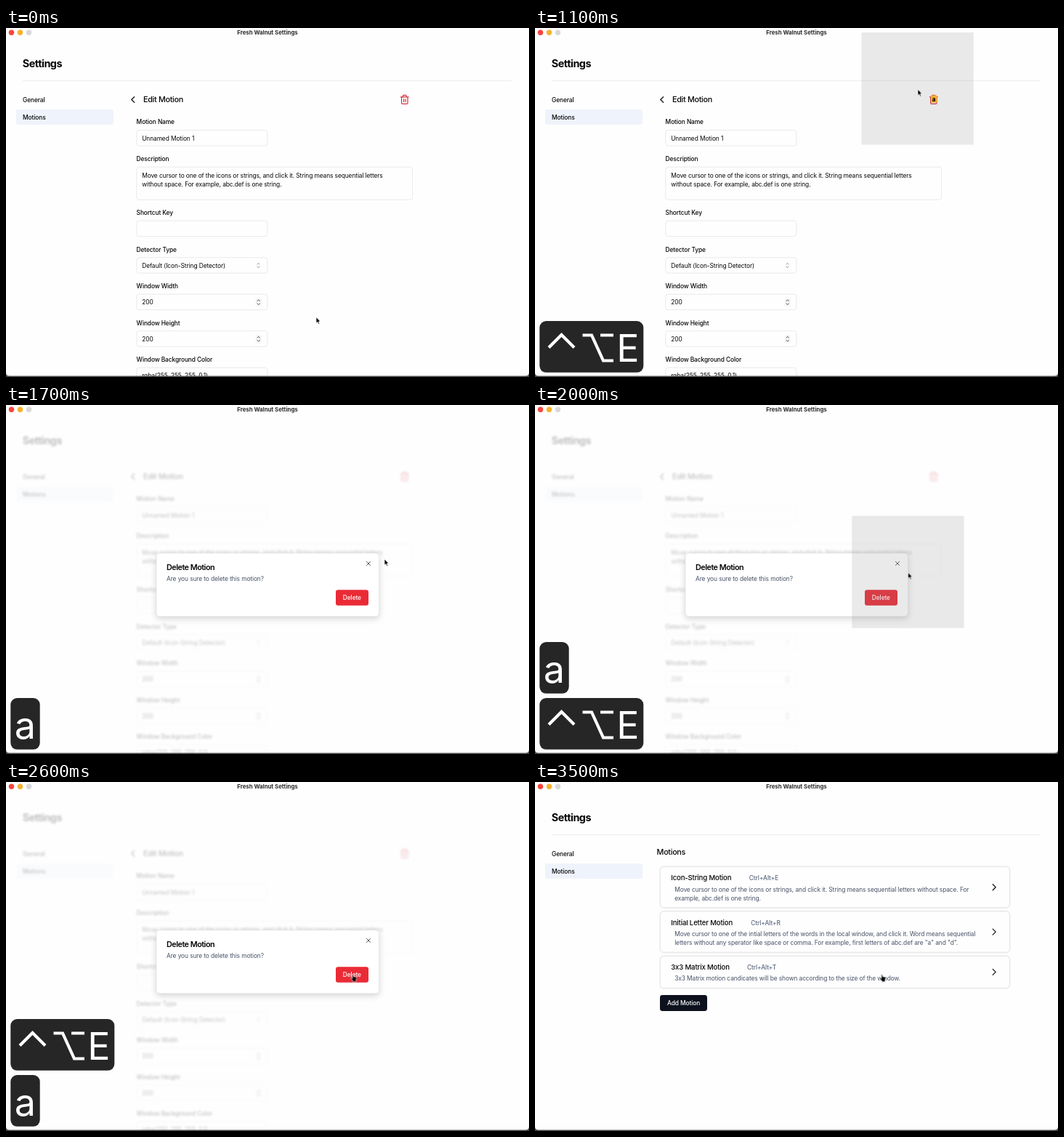
An HTML page that plays this animation: 720 by 480 pixels, repeating every 3600 ms.

```html
<!DOCTYPE html>
<html lang="en">
<head>
<meta charset="utf-8">
<title>Settings</title>
<style>
  html, body { margin: 0; width: 100%; height: 100%; overflow: hidden; background: #fefefe; }
  svg { display: block; width: 720px; height: 480px; }
  text {
    font: 430 8.4px Inter, "Noto Sans", sans-serif; letter-spacing: -.0115em;
    fill: #050608; white-space: pre; transform: translateY(.35px);
  }
  .label { font-weight: 540; letter-spacing: -.012em; }
  .bar { font-size: 7.8px; font-weight: 650; letter-spacing: 0; fill: #2c2c2c; }
  .h1 { font-size: 14.4px; font-weight: 700; letter-spacing: -.037em; }
  .h2 { font-size: 10.8px; font-weight: 530; letter-spacing: -.028em; }
  .h3 { font-size: 9.6px; font-weight: 530; letter-spacing: -.016em; }
  .ask { font-size: 10.8px; font-weight: 600; letter-spacing: -.046em; }
  .muted { fill: #465166; }
  .short { fill: #5d6a80; font-weight: 500; }
  .mid { text-anchor: middle; }
  .light { fill: #fff; }
  .tag { font-size: 8px; font-weight: 800; }
  .glyph { font-size: 52px; font-weight: 400; letter-spacing: 0; fill: #fff; }
  .line { fill: none; stroke: #16181d; stroke-width: 1.3; stroke-linecap: round; stroke-linejoin: round; }
  .field, .card { fill: #fefefe; stroke: #e2e5ea; stroke-width: .8; }
  .card { stroke: #dcdfe5; filter: drop-shadow(0 .8px .8px rgba(0, 0, 0, .1)); }
  .field { rx: 3.2px; }
  .card { rx: 5px; }
  .key { fill: #262626; rx: 9px; }
  .stroke { fill: none; stroke: #fff; stroke-width: 4.2; }

  .page, .form, .list, .dialog, .lens, .tagA, .tagB, .combo, .single, .arrow, .hand {
    animation: 3600ms step-end infinite;
  }
  .page { animation-name: page; }
  .form { animation-name: form; }
  .list { animation-name: list; }
  .dialog { animation-name: dialog; }
  .lens { animation-name: lens; }
  .tagA { animation-name: tagA; }
  .tagB { animation-name: tagB; }
  .combo { animation-name: combo; }
  .single { animation-name: single; }
  .arrow { animation-name: arrow; }
  .hand { animation-name: hand; }

  @keyframes page {
    0%, 75%, 100% { filter: none; opacity: 1; }
    38.88% { filter: blur(1.8px); opacity: .24; }
  }
  @keyframes form { 0% { opacity: 1; } 75%, 100% { opacity: 0; } }
  @keyframes list { 0% { opacity: 0; } 75%, 100% { opacity: 1; } }
  @keyframes dialog { 0%, 75%, 100% { opacity: 0; } 38.88% { opacity: 1; } }
  @keyframes lens {
    0%, 36.11%, 69.44%, 100% { opacity: 0; }
    25% { opacity: 1; transform: translate(449.8px, 6.5px); }
    52.77% { opacity: 1; transform: translate(436.6px, 152.8px); }
  }
  @keyframes tagA { 0%, 36.11%, 100% { opacity: 0; } 30.55% { opacity: 1; } }
  @keyframes tagB { 0%, 69.44%, 100% { opacity: 0; } 58.33% { opacity: 1; } }
  @keyframes combo {
    0%, 47.22%, 77.77%, 100% { opacity: 0; }
    22.22%, 50% { opacity: 1; transform: none; }
    36.11%, 69.44% { opacity: 1; transform: translateY(-77px); }
    44.44%, 75% { opacity: .5; }
  }
  @keyframes single {
    0%, 58.33%, 94.44%, 100% { opacity: 0; }
    36.11%, 69.44% { opacity: 1; transform: none; }
    50% { opacity: 1; transform: translateY(-77px); }
    91.66% { opacity: .5; }
  }
  @keyframes arrow {
    0%, 100% { opacity: 1; transform: translate(427px, 397.7px); }
    8.33% { transform: translate(430px, 390px); }
    11.11% { transform: translate(446px, 345px); }
    13.88% { transform: translate(476px, 245px); }
    16.66% { transform: translate(507px, 147px); }
    19.44% { transform: translate(523px, 96px); }
    22.22% { transform: translate(527px, 84.5px); }
    36.11% { opacity: 0; }
    41.66% { opacity: 1; transform: translate(547px, 112px); }
    44.44% { transform: translate(538px, 155px); }
    47.22% { transform: translate(521px, 212px); }
    50% { transform: translate(513.6px, 230.5px); }
    69.44% { opacity: 0; }
  }
  @keyframes hand {
    0%, 41.66%, 100% { opacity: 0; }
    36.11% { opacity: 1; transform: translate(546.5px, 97.3px); }
    69.44% { opacity: 1; transform: translate(474.5px, 264.3px); }
  }
</style>
</head>
<body>
<svg viewBox="0 0 720 480">
  <defs>
    <path id="next" class="line" d="M-1.8 -4l4 4l-4 4"/>
    <g id="spin">
      <rect x="-4" y="-6" width="8" height="12" rx="2" fill="#f5f5f5"/>
      <path class="line" style="stroke:#444;stroke-width:.95" d="M-1.7 -1.7L0 -3.4L1.7 -1.7M-1.7 1.7L0 3.4L1.7 1.7"/>
    </g>
  </defs>
  <rect width="720" height="480" fill="#fefefe"/>

  <g class="page">
    <text class="h1" x="22.8" y="53.6">Settings</text>
    <path d="M23 72.4H696" stroke="#e3e6eb" stroke-width=".8"/>
    <rect x="14" y="112" width="134" height="21" rx="2.4" fill="#eff3fb"/>
    <text class="label" x="23" y="101.4">General</text>
    <text class="label" x="23" y="125.4">Motions</text>

    <g class="form">
      <path class="line" d="M176.6 94.7L172.8 98.5L176.6 102.3"/>
      <text class="h2" x="189" y="102">Edit Motion</text>
      <g transform="translate(541.6 91.2) scale(.6)" fill="none" stroke="#d3303a" stroke-width="2" stroke-linecap="round" stroke-linejoin="round">
        <path d="M3 6h18M19 6v14c0 1-1 2-2 2H7c-1 0-2-1-2-2V6M8 6V4c0-1 1-2 2-2h4c1 0 2 1 2 2v2M10 11v6M14 11v6"/>
      </g>
      <text class="label" x="179.6" y="132">Motion Name</text>
      <text class="label" x="179.6" y="182.6">Description</text>
      <text class="label" x="179.6" y="256.8">Shortcut Key</text>
      <text class="label" x="179.6" y="307.2">Detector Type</text>
      <text class="label" x="179.6" y="357.7">Window Width</text>
      <text class="label" x="179.6" y="408.2">Window Height</text>
      <text class="label" x="179.6" y="458.6">Window Background Color</text>
      <rect class="field" x="179.8" y="140.6" width="180" height="21.4"/>
      <rect class="field" x="179.8" y="191.2" width="379.8" height="45"/>
      <rect class="field" x="179.8" y="265.2" width="180" height="21.4"/>
      <rect class="field" x="179.8" y="315.7" width="180" height="21.4"/>
      <rect class="field" x="179.8" y="366.2" width="180" height="21.4"/>
      <rect class="field" x="179.8" y="416.7" width="180" height="21.4"/>
      <rect class="field" x="179.8" y="467.2" width="180" height="21.4"/>
      <text x="187.2" y="154.4">Unnamed Motion 1</text>
      <text x="187.2" y="205.4">Move cursor to one of the icons or strings, and click it. String means sequential letters</text>
      <text x="187.2" y="217.4">without space. For example, abc.def is one string.</text>
      <text x="187.2" y="329.4">Default (Icon-String Detector)</text>
      <text x="187.2" y="380">200</text>
      <text x="187.2" y="430.5">200</text>
      <text x="187.2" y="481">rgba(255, 255, 255, 0.1)</text>
      <path class="line" style="stroke:#777;stroke-width:.8" d="M345.9 325L347.5 323.4L349.1 325M345.9 328L347.5 329.6L349.1 328"/>
      <use href="#spin" x="347.7" y="377.2"/>
      <use href="#spin" x="347.7" y="427.7"/>
    </g>

    <g class="list">
      <text class="h2" x="167.6" y="99.6">Motions</text>
      <rect class="card" x="172.4" y="116.6" width="481" height="56.2"/>
      <text class="h3" x="187.2" y="135.1">Icon-String Motion</text>
      <text class="short" x="294.8" y="135">Ctrl+Alt+E</text>
      <text class="muted" x="192.2" y="150.2">Move cursor to one of the icons or strings, and click it. String means sequential letters without space. For</text>
      <text class="muted" x="192.2" y="162.2">example, abc.def is one string.</text>
      <use href="#next" x="632" y="144.8"/>

      <rect class="card" x="172.4" y="178" width="481" height="56.2"/>
      <text class="h3" x="187.2" y="196.4">Initial Letter Motion</text>
      <text class="short" x="297.2" y="196.3">Ctrl+Alt+R</text>
      <text class="muted" x="192.2" y="211.5">Move cursor to one of the intial letters of the words in the local window, and click it. Word means sequential</text>
      <text class="muted" x="192.2" y="223.5">letters without any sperator like space or comma. For example, first letters of abc.def are "a" and "d".</text>
      <use href="#next" x="632" y="206.1"/>

      <rect class="card" x="172.4" y="239.4" width="481" height="44.2"/>
      <text class="h3" x="187.2" y="257.8">3x3 Matrix Motion</text>
      <text class="short" x="291.9" y="257.7">Ctrl+Alt+T</text>
      <text class="muted" x="192.2" y="272.8">3x3 Matrix motion candicates will be shown according to the size of the window.</text>
      <use href="#next" x="632" y="261.4"/>

      <rect x="172" y="293" width="65" height="22" rx="3.4" fill="#0c111d"/>
      <text class="label light mid" x="204.6" y="306.9">Add Motion</text>
    </g>
  </g>

  <circle cx="7.5" cy="6.2" r="3.7" fill="#f8473f"/>
  <circle cx="19.5" cy="6.2" r="3.7" fill="#f7b22c"/>
  <circle cx="31.5" cy="6.2" r="3.7" fill="#d8d8d8"/>
  <text class="bar mid" x="360" y="8.7">Fresh Walnut Settings</text>

  <g class="dialog">
    <rect x="207" y="203.8" width="306.6" height="87" rx="4.8" fill="#fff" stroke="#e0e4ea" stroke-width=".8"
      style="filter:drop-shadow(0 3px 4px rgba(0,0,0,.16))"/>
    <text class="ask" x="221" y="227">Delete Motion</text>
    <text class="muted" x="221" y="241.4">Are you sure to delete this motion?</text>
    <path class="line" style="stroke:#444;stroke-width:.9" d="M496.4 215.4l5.2 5.2M501.6 215.4l-5.2 5.2"/>
    <rect x="454" y="254.2" width="45" height="21.6" rx="3" fill="#ea2b36"/>
    <text class="label light mid" x="476.4" y="267.8">Delete</text>
  </g>

  <g class="lens">
    <rect width="153.6" height="153.6" fill="#8c8c8c" fill-opacity=".18" stroke="#000" stroke-opacity=".04"/>
  </g>
  <g class="tagA">
    <rect x="544.9" y="92.4" width="8.4" height="10.4" rx="1" fill="#f4ae2f"/>
    <text class="tag mid" x="549.1" y="100.2">a</text>
  </g>
  <g class="tagB">
    <rect x="472.3" y="259.8" width="8.4" height="10.4" rx="1" fill="#f4ae2f"/>
    <text class="tag mid" x="476.5" y="267.6">a</text>
  </g>

  <path d="M0 474V480H720V474Q720 478.6 715 478.6H5Q0 478.6 0 474Z" fill="#4a4a4a"/>

  <g class="combo">
    <rect class="key" x="6.3" y="403" width="143" height="70.8"/>
    <path class="stroke" d="M19 439.5L36.5 422L54 439.5M65.5 422.5H78L94 457.5H108M90 422.5H108"/>
    <text class="glyph" x="112.2" y="458.6">E</text>
  </g>
  <g class="single">
    <rect class="key" x="6.3" y="403" width="40.4" height="70.8"/>
    <text class="glyph mid" x="26.3" y="459">a</text>
  </g>

  <g stroke="#fff" stroke-width=".7" stroke-linejoin="round" fill="#000">
    <path class="arrow" d="M0 0V8.2L1.9 6.5L3.2 9.5L4.6 8.9L3.3 6L5.8 5.8Z"/>
    <path class="hand" d="M2 .9Q2.8 -.3 3.6 .9L4 3.2L7 3.9Q8.5 4.3 8.2 5.8L7.5 8.6V10.4H3.2L2.9 9L.3 6.1Q0 4.8 1.4 5.1L2.5 5.9Z"/>
  </g>
</svg>
</body>
</html>
```
